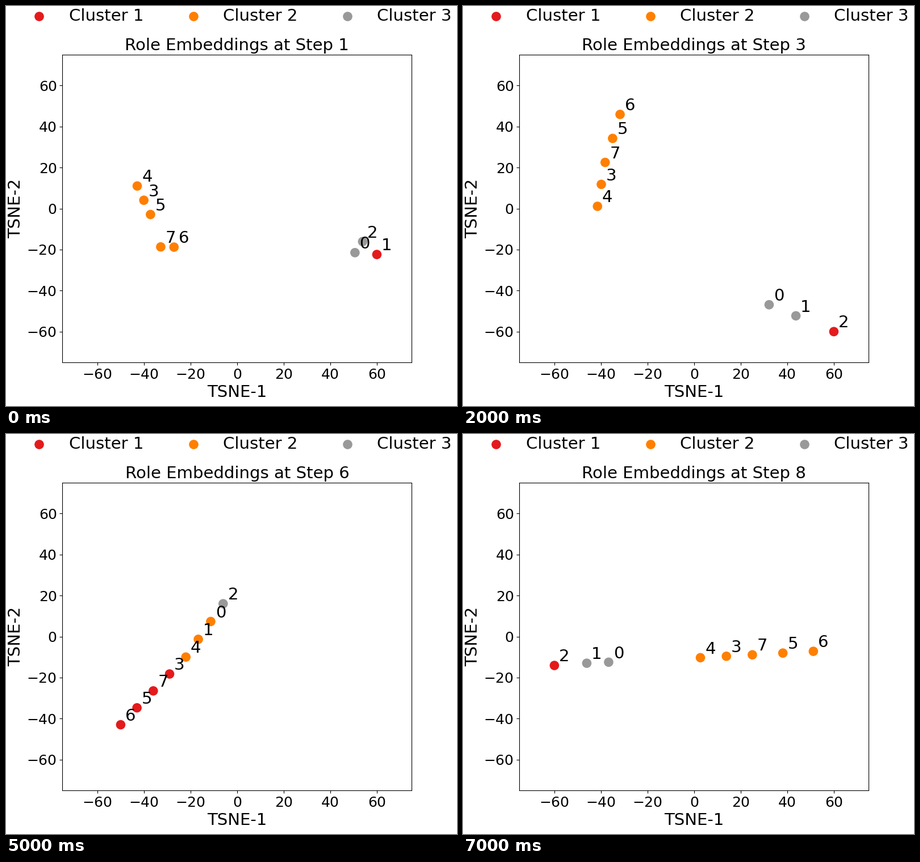
These frames come from a looping animation (794x706 px, 8000 ms). A matplotlib script:

```python
import matplotlib.pyplot as plt
import numpy as np
from matplotlib.animation import FuncAnimation

W, H, DPI = 794, 706, 100
BIG, SMALL, DOT = 21, 18, 120
COLORS = ["#e41a1c", "#ff7f00", "#999999"]
LIMIT, ROLES = 75, 8

plt.rcParams["font.family"] = "DejaVu Sans"

# Per step: the roles of clusters 1, 2 and 3 in chain order, and key points
# (x + yj) of some roles. The others lie evenly spaced between them.
STEPS = [
    ("1 43576 20", {1: 60-22.4j, 4: -42.9+11j, 5: -37.2-2.9j, 7: -32.8-18.7j,
                    6: -27.1-18.8j, 2: 53.9-16.1j, 0: 50.6-21.5j}),
    ("2 43756 10", {2: 60-18j, 4: -40+2j, 6: -28+30j, 1: 50-20j, 0: 41-14j}),
    ("2 43756 10", {2: 60-60j, 4: -41.5+1.1j, 7: -38.2+22.5j, 6: -31.8+45.9j,
                    1: 43.7-52.3j, 0: 32.2-46.9j}),
    ("2 37456 10", {2: 60+58j, 3: -36.5-60j, 4: -11.8-12.6j, 5: -23.2-55.7j,
                    6: -48.2-22j, 1: 40.5+27.4j, 0: 45.1+44.7j}),
    ("6537 410 2", {6: -59+60j, 5: -49.9+51j, 3: -36.3+41.1j, 7: -28.3+47.5j,
                    4: -19.3+32.8j, 1: -44.4+25.6j, 2: -49.3-0.5j}),
    ("6573 410 2", {6: -50-43j, 4: -22-10j, 2: -6+16j}),
    ("2 6573 410", {2: -7.6+19.5j, 6: -56.8+16.2j, 3: -36.6+14j,
                    4: -26.1+13.3j, 1: -14.4+14.2j, 0: -13.7+8.5j}),
    ("2 43756 10", {2: -60-14.1j, 4: 2.7-10.3j, 7: 25-8.9j, 6: 51.2-7.2j,
                    1: -46.1-13j, 0: -36.7-12.5j}),
]


def layout(clusters, keys):
    """Return the roles in chain order with their points and colours."""
    order = clusters.replace(" ", "")
    known = [order.index(str(role)) for role in keys]
    points = np.interp(range(ROLES), known, np.array(list(keys.values())))
    colors = [c for c, group in zip(COLORS, clusters.split()) for _ in group]
    return [int(role) for role in order], points, colors


fig = plt.figure(figsize=(W / DPI, H / DPI), dpi=DPI, facecolor="white")
ax = fig.add_axes([99.4 / W, 77 / H, 615 / W, 543 / H],
                  xlim=(-LIMIT, LIMIT), ylim=(-LIMIT, LIMIT))
ticks = range(-60, 61, 20)
ax.set_xticks(ticks)
ax.set_yticks(ticks)
ax.tick_params(labelsize=SMALL)
ax.set_xlabel("TSNE-1", fontsize=BIG)
ax.set_ylabel("TSNE-2", fontsize=BIG)
title = ax.set_title("", fontsize=BIG)

for i, color in enumerate(COLORS, 1):
    ax.scatter([], [], s=DOT, color=color, label=f"Cluster {i}")
ax.legend(loc="upper center", bbox_to_anchor=(0.5, 1.2), ncol=3,
          frameon=False, fontsize=BIG, scatterpoints=1)

dots = ax.scatter([0] * ROLES, [0] * ROLES, s=DOT, zorder=2)
labels = [ax.text(0, 0, str(i), fontsize=BIG, zorder=3) for i in range(ROLES)]


def draw(i):
    roles, points, colors = layout(*STEPS[i])
    title.set_text(f"Role Embeddings at Step {i + 1}")
    dots.set_offsets(np.column_stack([points.real, points.imag]))
    dots.set_color(colors)
    for role, p in zip(roles, points):
        labels[role].set_position((p.real + 2, p.imag + 2))
    return [title, dots, *labels]


anim = FuncAnimation(fig, draw, frames=len(STEPS), init_func=lambda: draw(0),
                     interval=1000, repeat=True, repeat_delay=0, blit=False)
plt.show()
```
